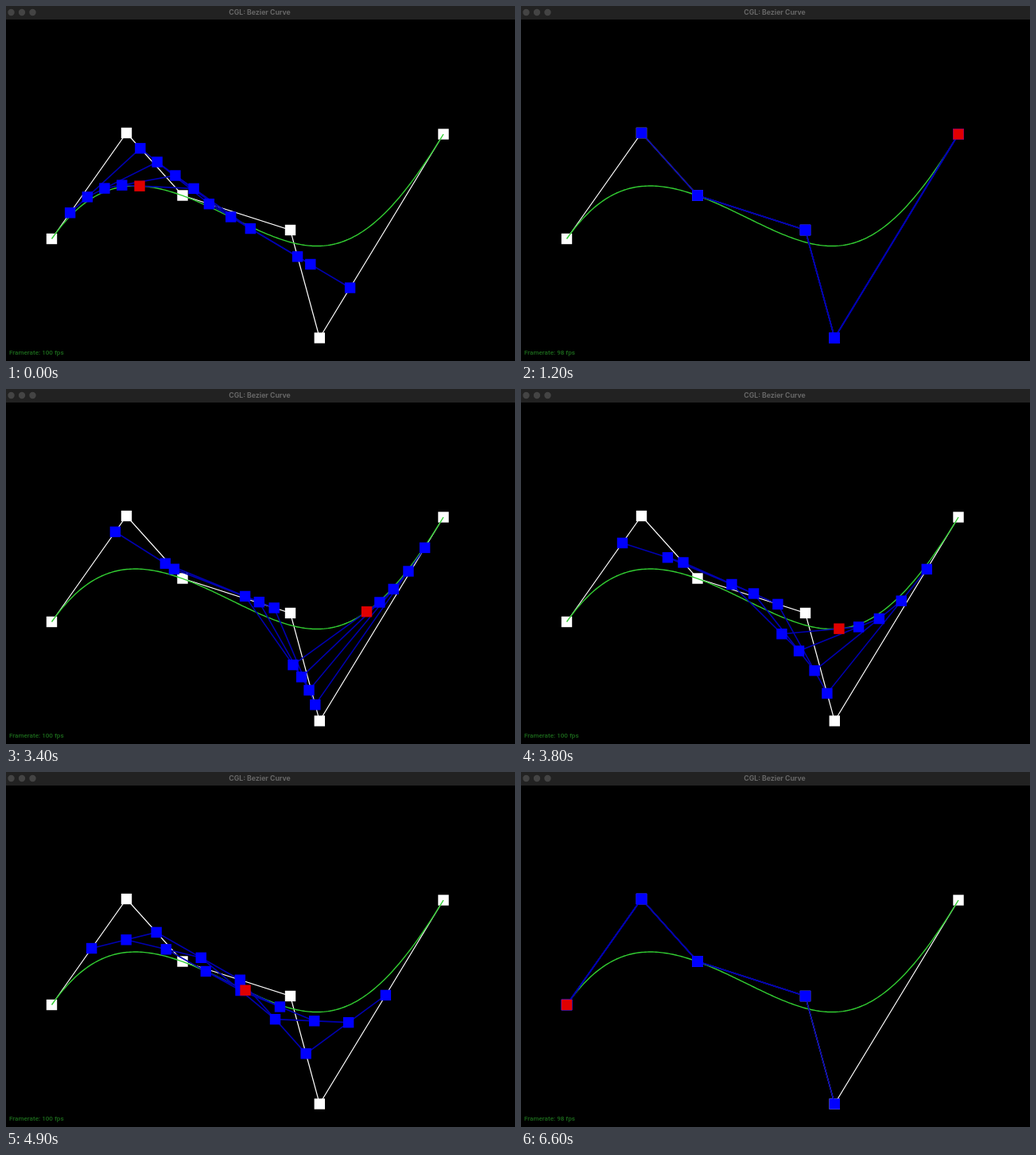
An HTML page with a canvas for the animation above (6.7 s loop, 640x446 px).

```html
<!DOCTYPE html>
<html lang="en">
<head>
<meta charset="utf-8">
<title>Bezier Curve</title>
<style>
  html, body { margin: 0; width: 100%; height: 100%; overflow: hidden; background: #000; }
  canvas { display: block; }
</style>
</head>
<body>
<canvas id="stage" width="640" height="446"></canvas>
<script>
const ctx = document.getElementById('stage').getContext('2d');
const LOOP = 6700, STEP = 100;
const control = [[57.5, 292.5], [151.5, 159.5], [222, 238], [357.5, 281.5], [394.3, 417], [550, 161]];

// [time in ms, curve parameter]
const keys = [[0, .246], [100, .246], [1050, 1], [2275, 1], [2500, .971], [3400, .85],
  [4300, .613], [5600, .441], [6500, 0], [6700, 0]];
// [start in ms, displayed frame rate]
const rates = [[0, 100], [900, 98], [2200, 100], [5300, 99], [6400, 98]];

const mix = (a, b, t) => a + (b - a) * t;

function parameterAt(ms) {
  const i = keys.findIndex(k => k[0] > ms);
  const [t0, v0] = keys[i - 1], [t1, v1] = keys[i];
  return mix(v0, v1, (ms - t0) / (t1 - t0));
}

const reduce = (pts, t) =>
  pts.slice(1).map((p, i) => [mix(pts[i][0], p[0], t), mix(pts[i][1], p[1], t)]);

// De Casteljau: every level of interpolated points, ending in the curve point
function levels(t) {
  const out = [];
  for (let pts = control; pts.length > 1;) out.push(pts = reduce(pts, t));
  return out;
}

const curve = Array.from({ length: 201 }, (_, i) => levels(i / 200)[4][0]);

function line(pts, color, width) {
  ctx.beginPath();
  pts.forEach(p => ctx.lineTo(...p));
  ctx.strokeStyle = color;
  ctx.lineWidth = width;
  ctx.stroke();
}

function squares(pts, color) {
  ctx.fillStyle = color;
  pts.forEach(([x, y]) => ctx.fillRect(x - 6.7, y - 6.7, 13.4, 13.4));
}

function text(str, x, y, font, color, align) {
  ctx.font = font;
  ctx.fillStyle = color;
  ctx.textAlign = align;
  ctx.fillText(str, x, y);
}

function titleBar() {
  ctx.fillStyle = '#222';
  ctx.fillRect(0, 0, 640, 17);
  ctx.fillStyle = '#444';
  for (const x of [6.5, 20, 33.5]) {
    ctx.beginPath();
    ctx.arc(x, 8, 4.2, 0, 2 * Math.PI);
    ctx.fill();
  }
  text('CGL: Bezier Curve', 319, 11, 'bold 8.7px Inter, sans-serif', '#666', 'center');
}

function draw(now) {
  const ms = Math.floor(now % LOOP / STEP) * STEP;
  const steps = levels(parameterAt(ms));
  ctx.fillStyle = '#000';
  ctx.fillRect(0, 0, 640, 446);
  titleBar();

  line(control, '#fff', 1.2);
  squares(control, '#fff');
  line(curve, '#32cd32', 1.4);
  steps.forEach(pts => line(pts, '#0000b0', 1.6));
  steps.forEach((pts, i) => squares(pts, i < 4 ? '#00f' : '#e00000'));

  const fps = rates.filter(r => r[0] <= ms).pop()[1];
  text(`Framerate: ${fps} fps`, 4, 438, '500 8.1px Roboto, sans-serif', '#1c6b1c', 'left');
}

const start = performance.now();
function tick() {
  draw(performance.now() - start);
  requestAnimationFrame(tick);
}
tick();
</script>
</body>
</html>
```
